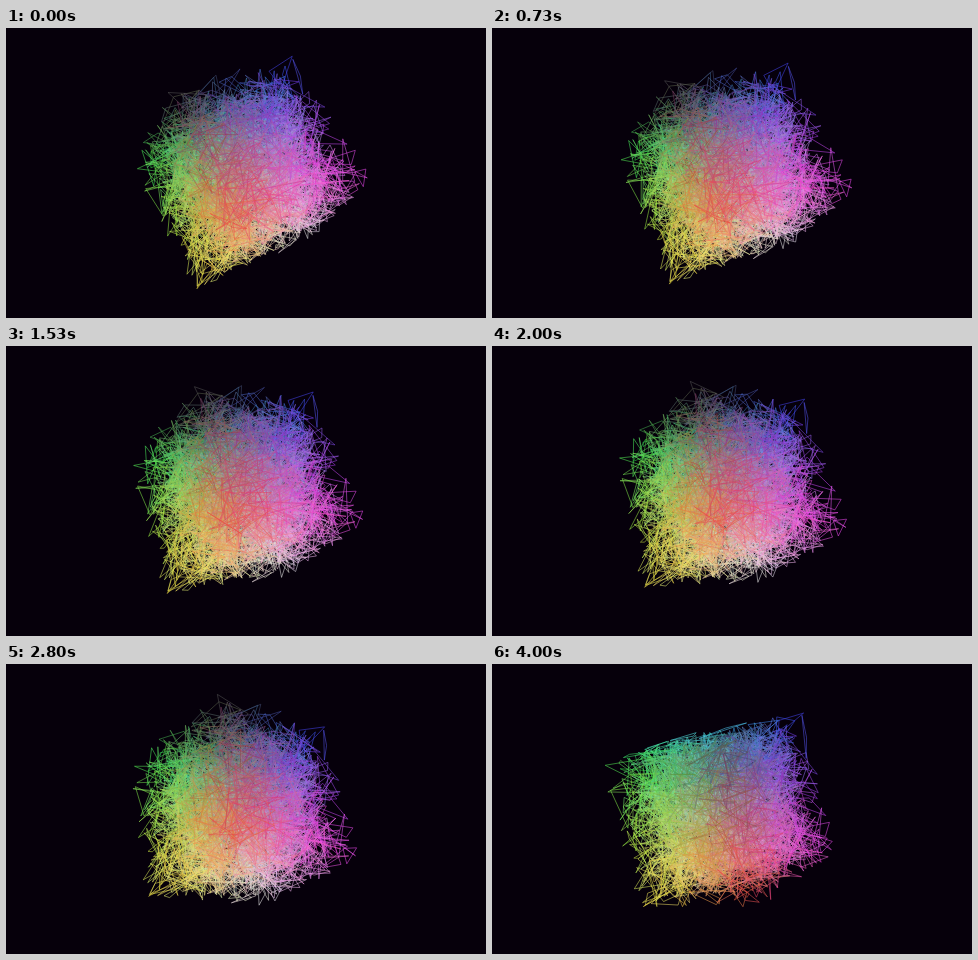
Recreate the animation shown at these times as an HTML page with a canvas. Size 480 px wide and 290 px high, loop 4070 ms.

```html
<!DOCTYPE html>
<html lang="en">
<head>
<meta charset="utf-8">
<title>Colour cube</title>
<style>
  html, body { margin: 0; width: 100%; height: 100%; overflow: hidden; background: #06000b; }
  canvas { display: block; width: 480px; height: 290px; }
</style>
</head>
<body>
<canvas id="stage" width="480" height="290"></canvas>
<script>
const ctx = document.getElementById('stage').getContext('2d');
const LOOP = 4070, STEPS = 61;
const COUNT = 1900, HALF = 63, SPREAD = 26, LIMIT = 74, CORNER = 71, CAMERA = 700;

// Poses: screen directions of the red and green axes (x right, y down, z to the viewer).
const START = { red: [.47, .83, .30], green: [-.28, .54, -.79], cx: 239 };
const TURNED = { red: [.16, .89, .42], green: [-.63, .44, -.64], cx: 234 };
const ROLLED = { red: [.88, .44, -.20], green: [-.49, .51, -.71], cx: 236 };
const TIPPED = { red: [.21, .96, -.17], green: [-.80, .06, -.60], cx: 230 };

// How far the slow first turn has come: [ms, share].
const TURN = [[0, 0], [730, .29], [1530, .61], [2400, .94], [2800, 1]];

let seed = 20117;
function random() {
  seed = (seed + 0x6D2B79F5) | 0;
  let t = Math.imul(seed ^ (seed >>> 15), 1 | seed);
  t = (t + Math.imul(t ^ (t >>> 7), 61 | t)) ^ t;
  return ((t ^ (t >>> 14)) >>> 0) / 4294967296;
}
const spread = r => (random() * 2 - 1) * r;
const clamp = (v, r) => Math.max(-r, Math.min(r, v));

const mix = (a, b, k) => a + (b - a) * k;
const mixVec = (a, b, k) => a.map((v, i) => mix(v, b[i], k));
const dot = (a, b) => a[0] * b[0] + a[1] * b[1] + a[2] * b[2];
const cross = (a, b) => [
  a[1] * b[2] - a[2] * b[1],
  a[2] * b[0] - a[0] * b[2],
  a[0] * b[1] - a[1] * b[0]
];
function unit(v) {
  const len = Math.hypot(...v);
  return v.map(n => n / len);
}

// Pale tones: no channel falls to zero.
const channel = c => Math.round(52 + 190 * Math.pow(c / (2 * HALF) + .5, .65));

function makeTriangle(i) {
  const corner = i < 8 ? [1, 2, 4].map(bit => (i & bit ? 1 : -1)) : null;
  const centre = corner ? corner.map(s => s * (HALF - 8)) : [0, 0, 0].map(() => spread(HALF));
  const points = [0, 1, 2].map(() => centre.map(c => clamp(c + spread(SPREAD), LIMIT)));
  if (corner) points[0] = corner.map(s => s * CORNER);
  return { centre, points, color: `rgba(${centre.map(channel)}, .72)`, depth: 0 };
}
const triangles = Array.from({ length: COUNT }, (_, i) => makeTriangle(i));

function turnShare(t) {
  const i = TURN.findIndex(key => t <= key[0]);
  if (i < 1) return 0;
  const [t0, v0] = TURN[i - 1], [t1, v1] = TURN[i];
  return mix(v0, v1, (t - t0) / (t1 - t0));
}
const smooth = k => k * k * (3 - 2 * k);

function poseAt(t) {
  let from = START, to = TURNED, k;
  if (t <= 2800) k = turnShare(t);
  else if (t <= 3400) [from, to, k] = [TURNED, ROLLED, smooth((t - 2800) / 600)];
  else [from, to, k] = [ROLLED, TIPPED, smooth(Math.min(1, (t - 3400) / 600))];

  const red = unit(mixVec(from.red, to.red, k));
  const rough = mixVec(from.green, to.green, k);
  const lean = dot(rough, red);
  const green = unit(rough.map((v, i) => v - lean * red[i]));
  const blue = cross(green, red);
  const rows = [0, 1, 2].map(i => [red[i], green[i], blue[i]]);
  return { rows, cx: mix(from.cx, to.cx, k) };
}

function draw(t) {
  const { rows, cx } = poseAt(t);
  const project = p => {
    const scale = CAMERA / (CAMERA - dot(rows[2], p));
    return [cx + dot(rows[0], p) * scale, 145 + dot(rows[1], p) * scale];
  };
  ctx.fillStyle = '#06000b';
  ctx.fillRect(0, 0, 480, 290);
  ctx.lineWidth = .75;
  ctx.lineJoin = 'bevel';
  for (const tri of triangles) tri.depth = dot(rows[2], tri.centre);
  triangles.sort((a, b) => a.depth - b.depth);
  for (const tri of triangles) {
    const [a, b, c] = tri.points.map(project);
    ctx.strokeStyle = tri.color;
    ctx.beginPath();
    ctx.moveTo(...a);
    ctx.lineTo(...b);
    ctx.lineTo(...c);
    ctx.closePath();
    ctx.stroke();
  }
}

const began = performance.now();
let shown = -1;
function tick() {
  const t = (performance.now() - began) % LOOP;
  const step = Math.floor(t / LOOP * STEPS);
  if (step !== shown) {
    shown = step;
    draw(step * LOOP / STEPS);
  }
  requestAnimationFrame(tick);
}
tick();
</script>
</body>
</html>
```
